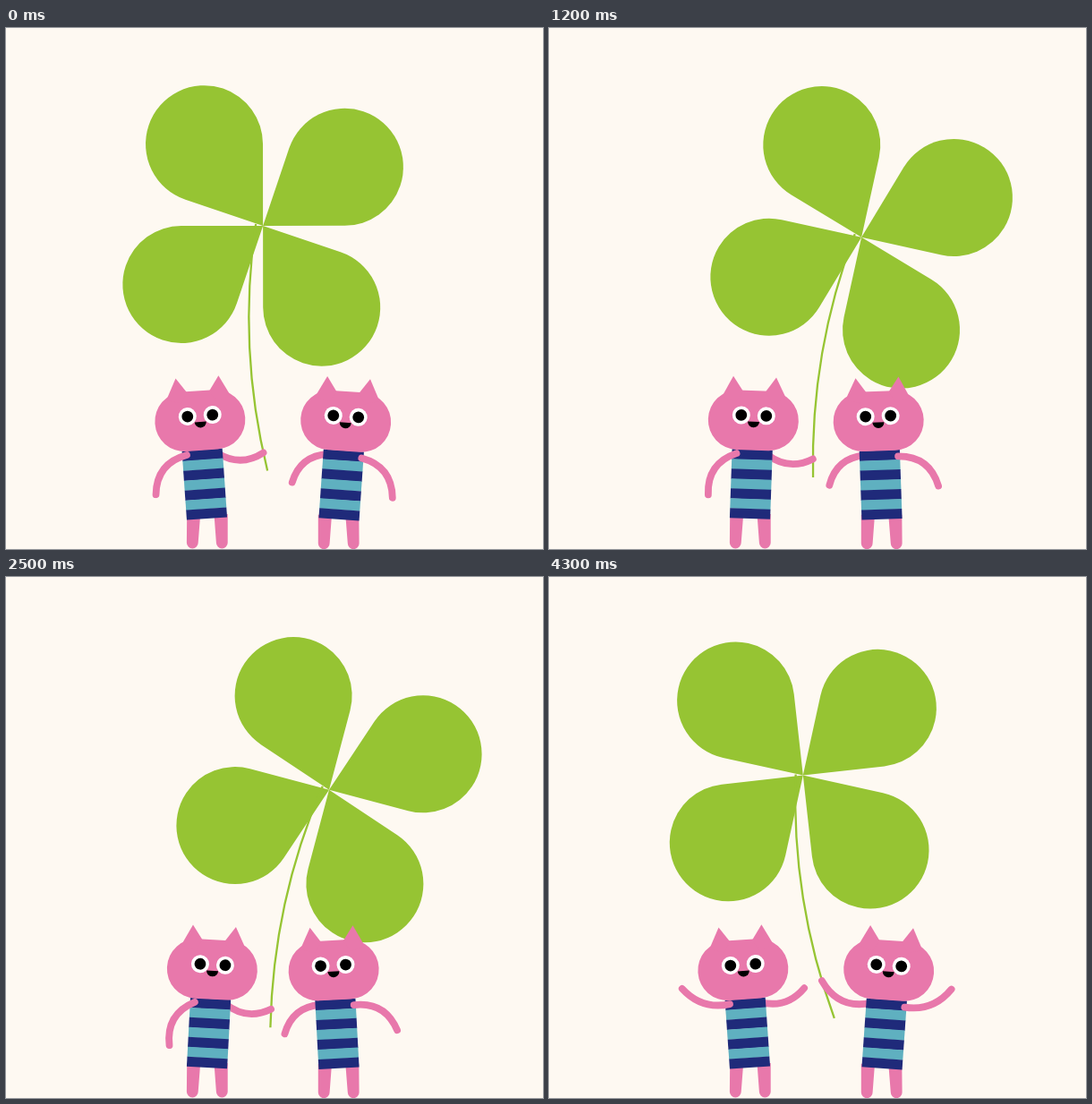
Write an HTML page with a canvas that moves like this. It is 600 px wide and 582 px high and loops after 4.4 s.

```html
<!DOCTYPE html>
<html lang="en">
<head>
<meta charset="utf-8">
<title>Two cats and a clover</title>
<style>
html, body { margin: 0; width: 100%; height: 100%; overflow: hidden; background: #fef9f2; }
canvas { display: block; }
</style>
</head>
<body>
<canvas id="stage" width="600" height="582"></canvas>
<script>
const ctx = document.getElementById('stage').getContext('2d');
const LOOP = 4400, STEP = 100, HANDOVER = 3100;
const PINK = '#e878ab', GREEN = '#96c433', NAVY = '#1f2a7a', TEAL = '#5fb0c0', PAPER = '#fef9f2';
const rad = deg => deg * Math.PI / 180;
const mix = (a, b, p) => a + (b - a) * p;

// Eased value at time t from [time, value] pairs.
function track(t, keys) {
  if (t <= keys[0][0]) return keys[0][1];
  for (let i = 1; i < keys.length; i++) {
    const [t0, a] = keys[i - 1], [t1, b] = keys[i];
    if (t <= t1) return mix(a, b, (1 - Math.cos(Math.PI * (t - t0) / (t1 - t0))) / 2);
  }
  return keys[keys.length - 1][1];
}

const TILT = [[0, -4], [900, 4], [1800, -4], [2700, 4], [3300, 4], [4260, -4]];
const SPIN = [[125, 0], [825, 15.8], [890, 15.8], [1880, 0.8], [3000, 25], [3220, 25], [3980, -6.3]];
const SWING = [[0, 48], [430, 67], [860, 40], [1300, 60], [1950, 52], [2460, 63], [2950, 40], [3450, 63], [3500, 63], [4200, -22]];
const RIGHT_SWING = [[2460, 33], [2950, 56], [3450, 53], [3500, 53], [4200, -25]];
const GRIP = [[3500, 0.905], [4200, 0.843]];

const STEM = [[-8, -2], [-28.5, 136.5], [5, 273.5]];
function stemPoint(u) {
  const at = i => (1 - u) ** 2 * STEM[0][i] + 2 * u * (1 - u) * STEM[1][i] + u * u * STEM[2][i];
  return [at(0), at(1)];
}

function rotate([x, y], a) {
  return [x * Math.cos(a) - y * Math.sin(a), x * Math.sin(a) + y * Math.cos(a)];
}

function drawClover(x, y, spin) {
  const R = 65.5, D = 112.4, open = rad(125.6);
  ctx.save();
  ctx.translate(x, y);
  ctx.rotate(spin);
  ctx.fillStyle = ctx.strokeStyle = GREEN;
  for (let i = 0; i < 4; i++) {
    const a = rad(-35.7 + 90 * i);
    ctx.beginPath();
    ctx.moveTo(0, 0);
    ctx.arc(D * Math.cos(a), D * Math.sin(a), R, a - open, a + open);
    ctx.fill();
  }
  ctx.lineWidth = 2.3;
  ctx.lineCap = 'butt';
  ctx.beginPath();
  ctx.moveTo(...STEM[0]);
  ctx.quadraticCurveTo(...STEM[1], ...STEM[2]);
  ctx.stroke();
  ctx.restore();
}

// Positive bulge bends the arm upwards and outwards.
function drawArm([sx, sy], [hx, hy], bulge) {
  const dx = hx - sx, dy = hy - sy, side = Math.sign(dx);
  const k = 2 * bulge * side / Math.hypot(dx, dy);
  ctx.strokeStyle = PINK;
  ctx.lineWidth = 7.8;
  ctx.lineCap = 'round';
  ctx.beginPath();
  ctx.moveTo(sx, sy);
  ctx.quadraticCurveTo((sx + hx) / 2 + dy * k, (sy + hy) / 2 - dx * k, hx, hy);
  ctx.stroke();
}

function disc(x, y, r, color) {
  ctx.fillStyle = color;
  ctx.beginPath();
  ctx.arc(x, y, r, 0, 7);
  ctx.fill();
}

function drawLeg(outer, inner, foot) {
  ctx.beginPath();
  ctx.moveTo(outer, -5);
  ctx.lineTo(inner, -5);
  ctx.lineTo(foot + 6.4, 27);
  ctx.arc(foot, 27, 6.4, 0, Math.PI);
  ctx.fill();
}

function drawHead() {
  ctx.fillStyle = PINK;
  ctx.beginPath();
  ctx.roundRect(-50.5, -143, 101, 66.5, 33);
  ctx.fill();
  for (const s of [-1, 1]) {
    ctx.beginPath();
    ctx.moveTo(s * 36, -135);
    ctx.lineTo(s * 24, -158.5);
    ctx.lineTo(s * 12.5, -142);
    ctx.lineTo(s * 20, -130);
    ctx.fill();
  }
  for (const x of [-13.7, 14.3]) {
    disc(x, -115.2, 10, '#fff');
    disc(x, -115.2, 6.4, '#000');
  }
  ctx.beginPath();
  ctx.arc(0.3, -108.3, 6.5, 0, Math.PI);
  ctx.fill();
}

// Local x runs towards the other cat.
function drawCat(cat, tilt) {
  ctx.save();
  ctx.translate(cat.x, cat.y);
  ctx.scale(cat.side, 1);
  ctx.fillStyle = PINK;
  drawLeg(-22.3, -7.3, -16.2);
  drawLeg(8, 23.2, 16.8);
  ctx.rotate(tilt);
  drawArm([17, -72], cat.hand, cat.bulge);
  for (let i = 0; i < 7; i++) {
    ctx.fillStyle = i % 2 ? TEAL : NAVY;
    ctx.fillRect(-22.6, -77 + 11 * i, 45.2, i < 6 ? 11.4 : 11);
  }
  drawHead();
  const a = rad(cat.swing), [sx, sy] = cat.shoulder;
  const bend = Math.max(-8, Math.min(10.5, -8 + (cat.swing + 20) * 0.4));
  drawArm([sx, sy], [sx - 56 * Math.cos(a), sy + 56 * Math.sin(a)], bend);
  ctx.restore();
}

function drawScene(t) {
  const tilt = rad(track(t, TILT)), spin = rad(track(t, SPIN)), swing = track(t, SWING);
  const left = {
    x: 224.5, y: 548, side: 1, shoulder: [-17.5, -72.3], swing, bulge: -8,
    hand: [track(t, [[3500, 68], [4200, 66.7]]),
           track(t, [[HANDOVER, -69], [3450, -64], [3500, -64], [4200, -84.4]])]
  };

  const reach = track(t, [[2650, 0], [3050, 1]]);
  const hang = rad(43 - 0.4 * (swing - 48));
  const right = {
    x: 372, y: 548.8, side: -1, shoulder: [-20.5, -69.8],
    swing: t < 2460 ? 96 - swing : track(t, RIGHT_SWING),
    bulge: mix(9, -11, reach),
    hand: [mix(17 + 52 * Math.cos(hang), track(t, [[3500, 65.4], [4200, 73.7]]), reach),
           mix(-73 + 52 * Math.sin(hang), track(t, [[3500, -74], [4200, -92.8]]), reach)]
  };

  const early = t < HANDOVER;
  const holder = early ? left : right;
  const [hx, hy] = rotate(holder.hand, tilt);
  const [gx, gy] = rotate(stemPoint(early ? 0.927 : track(t, GRIP)), spin);

  ctx.fillStyle = PAPER;
  ctx.fillRect(0, 0, 600, 582);
  drawClover(holder.x + holder.side * hx - gx, holder.y + hy - gy, spin);
  drawCat(left, tilt);
  drawCat(right, tilt);
}

const start = performance.now();
function tick() {
  const t = (performance.now() - start) % LOOP;
  drawScene(Math.floor(t / STEP) * STEP);
  requestAnimationFrame(tick);
}
tick();
</script>
</body>
</html>
```
